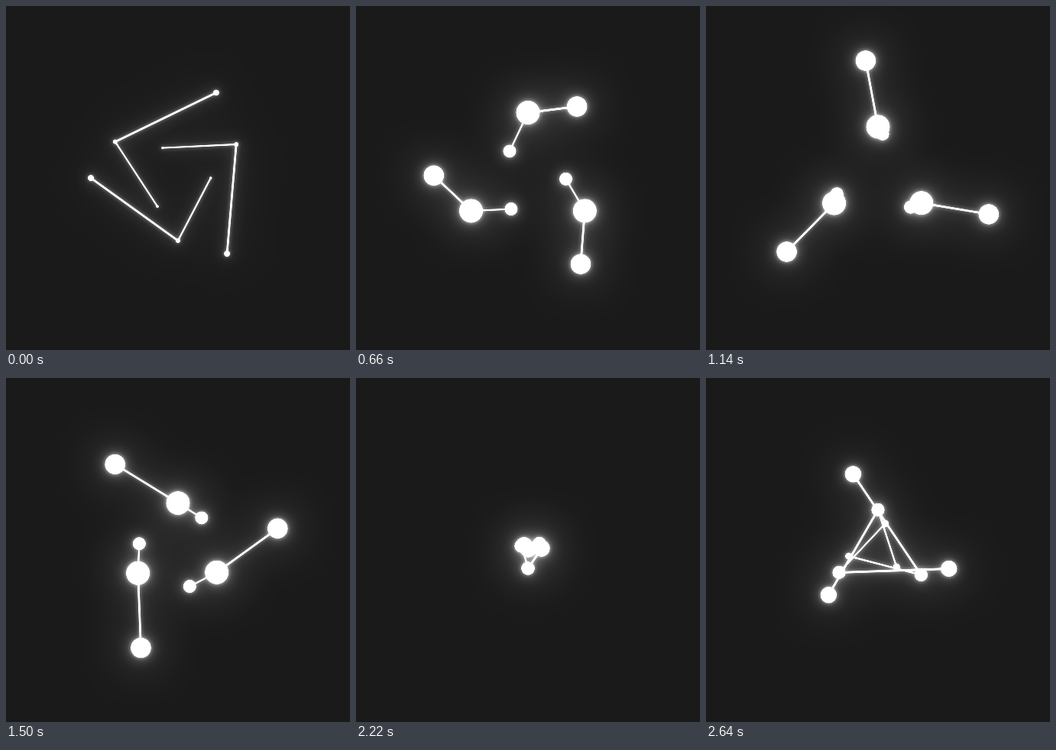
These frames come from a looping animation (450 by 450 pixels, 2.7 s). An HTML page with a canvas:

```html
<!DOCTYPE html>
<html>
<head>
<meta charset="utf-8">
<style>
html, body { margin: 0; width: 100%; height: 100%; overflow: hidden; background: #1a1a1a; }
canvas { display: block; width: 450px; height: 450px; }
</style>
</head>
<body>
<canvas id="stage" width="450" height="450"></canvas>
<script>
const SIZE = 450, MID = SIZE / 2;
const LOOP = 2700, STEP = 60;
const SPIN = 0.0842;   // degrees per ms
const LAG = 35;        // ms between neighbouring arms
const INNER = 0.375;   // inner reach relative to outer reach

const stage = document.getElementById('stage').getContext('2d');
const layer = document.createElement('canvas');
layer.width = layer.height = SIZE;
const pen = layer.getContext('2d');
pen.strokeStyle = pen.fillStyle = '#fff';
pen.lineCap = 'round';

// Smooth curve through [time, value] keys, flat at every peak
function swing(keys) {
  const last = keys.length - 1;
  const slope = i => (keys[i + 1][1] - keys[i][1]) / (keys[i + 1][0] - keys[i][0]);
  const tangent = i => {
    if (i === 0) return slope(0);
    if (i === last) return slope(last - 1);
    const a = slope(i - 1), b = slope(i);
    return a * b > 0 ? 2 * a * b / (a + b) : 0;
  };
  return t => {
    let i = 0;
    while (i < last - 1 && t > keys[i + 1][0]) i++;
    const [t0, v0] = keys[i], [t1, v1] = keys[i + 1];
    const h = t1 - t0, s = Math.min(1, (t - t0) / h), r = 1 - s;
    return r * r * ((1 + 2 * s) * v0 + s * h * tangent(i)) +
           s * s * ((3 - 2 * s) * v1 - r * h * tangent(i + 1));
  };
}

// Signed distance from the centre: negative means the opposite side
const outerReach = swing([[0, 114], [230, 137], [420, 138], [560, -80], [930, -157],
  [1550, -136], [1980, 98], [2220, 18], [2720, -107]]);
const middleReach = swing([[0, 82], [200, 112], [395, 87], [430, 23], [560, -80], [700, -86],
  [1140, -67], [1550, -60], [1980, 75], [2220, 24], [2720, -67]]);

function ease(t, from, to) {
  const s = Math.min(1, Math.max(0, (t - from) / (to - from)));
  return s * s * (3 - 2 * s);
}

function polar(r, deg) {
  const a = deg * Math.PI / 180;
  return [MID + r * Math.cos(a), MID + r * Math.sin(a)];
}

function dot([x, y], r) {
  pen.beginPath();
  pen.arc(x, y, r, 0, 2 * Math.PI);
  pen.fill();
}

function line(a, b, width) {
  pen.lineWidth = width;
  pen.beginPath();
  pen.moveTo(...a);
  pen.lineTo(...b);
  pen.stroke();
}

function arm(t, axis) {
  const turn = 90 - SPIN * t, reach = outerReach(t);
  const outer = polar(reach, axis + turn);
  const middle = polar(middleReach(t), axis);
  const inner = polar(reach * INNER, axis - turn);
  const grow = ease(t, 390, 640), fade = ease(t, 1550, 2300);
  line(outer, middle, 2.4);
  line(middle, inner, 1.9);
  dot(outer, 3.7 + 9.3 * grow * (1 - 0.27 * fade));
  dot(middle, 2.8 + 12.4 * grow * (1 - 0.55 * fade));
  dot(inner, 1.7 + 6.6 * grow * (1 - 0.6 * fade));
}

function bloom(blur, strength) {
  stage.filter = blur ? `blur(${blur}px)` : 'none';
  stage.globalAlpha = strength;
  stage.drawImage(layer, 0, 0);
}

function draw(t) {
  pen.clearRect(0, 0, SIZE, SIZE);
  for (let k = 0; k < 3; k++) arm(t + k * LAG, 90 - 120 * k);

  stage.filter = 'none';
  stage.globalAlpha = 1;
  stage.globalCompositeOperation = 'source-over';
  stage.fillStyle = '#1a1a1a';
  stage.fillRect(0, 0, SIZE, SIZE);
  stage.globalCompositeOperation = 'lighter';
  bloom(30, 0.6);
  bloom(9, 0.45);
  bloom(2.5, 0.5);
  bloom(0, 1);
}

const start = performance.now();
function tick() {
  const t = (performance.now() - start) % LOOP;
  draw(Math.floor(t / STEP) * STEP);
  requestAnimationFrame(tick);
}
tick();
</script>
</body>
</html>
```
